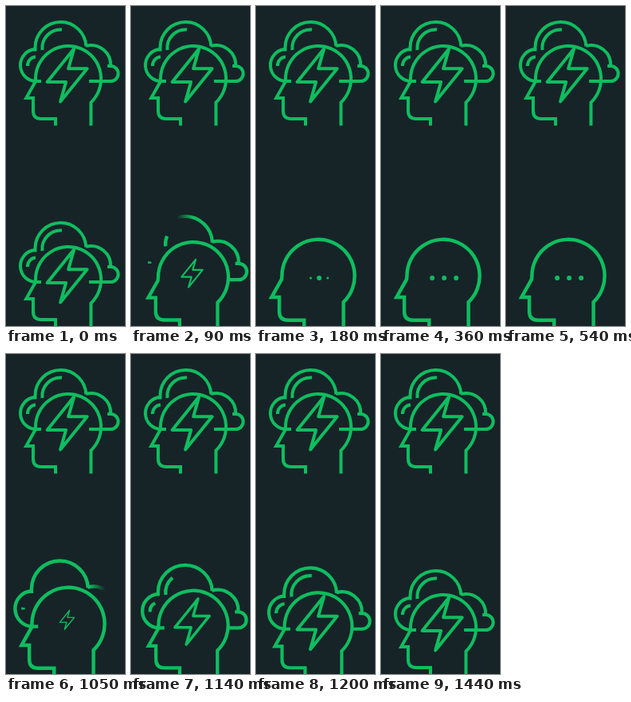
An HTML page with a canvas that plays this animation: 149 px wide and 400 px high, repeating every 1920 ms.

```html
<!DOCTYPE html>
<html lang="en">
<head>
<meta charset="utf-8">
<style>
  html, body { margin: 0; overflow: hidden; background: #162428; }
  canvas { display: block; }
</style>
</head>
<body>
<canvas id="stage" width="149" height="400"></canvas>
<script>
const ctx = document.getElementById('stage').getContext('2d');
const LOOP = 1920, GROWTH = 0.11;
const BG = '#162428', GREEN = '#0fbd5f', CLEAR = '#0fbd5f00';

const head = new Path2D('M62 149.5V141H44Q34 141 34 131V115H25.3L36.6 95L37 91A41 41 0 1 1 106.4 120.6V149.5');
const cloud = new Path2D('M44 94H38A20 20 0 0 1 36 54.1M36.5 56.5V52A32 32 0 0 1 68.4 20' +
  'A32 32 0 0 1 100.3 50.5M100 49.9A24.5 24.5 0 0 1 131 75M127 75H131A9.5 9.5 0 0 1 131 94H120');
const smallArc = new Path2D('M27 75A11 11 0 0 1 37 63.5');
const bigArc = new Path2D('M45.5 55A23 23 0 0 1 70 29.5');
const bolt = new Path2D('M8.5 -33L-25 8.3H-1.5L-8.5 33L25 -8.3H1.5Z');

const outQuad = p => 1 - (1 - p) ** 2;
const outCubic = p => 1 - (1 - p) ** 3;

function poseAt(t) {
  const ramp = (from, to) => Math.min(1, Math.max(0, (t - from) / (to - from)));
  const leaving = t < 700;
  return {
    zoom: 1 + GROWTH * outQuad(ramp(30, 180)) * (1 - outCubic(ramp(1080, 1440))),
    leaving,
    wipe: leaving ? 170 * ramp(30, 165) : 190 * ramp(900, 1140),
    small: leaving ? 1 - ramp(30, 100) : ramp(1030, 1180),
    big: leaving ? 1 - ramp(30, 120) : ramp(1055, 1200),
    bolt: leaving ? 1 - ramp(30, 150) : outQuad(ramp(1010, 1240)),
    tail: leaving ? 1 - ramp(30, 90) : outQuad(ramp(1230, 1440)),
    spread: outCubic(ramp(80, 380)),
    midDot: ramp(80, 175),
    sideDot: outQuad(ramp(90, 400)),
    slide: 46 * Math.max(0, (t - 720) / 150) ** 2
  };
}

function strokePart(path, length, shown) {
  if (shown <= 0) return;
  ctx.setLineDash(shown < 1 ? [length * shown, 999] : []);
  ctx.stroke(path);
  ctx.setLineDash([]);
}

function drawDots(pose) {
  if (pose.slide > 100) return;
  ctx.save();
  ctx.clip(head);
  ctx.fillStyle = GREEN;
  for (const i of [-1, 0, 1]) {
    const radius = 2.7 * (i ? pose.sideDot : pose.midDot);
    ctx.beginPath();
    ctx.arc(79 + (i * 15 * pose.spread - pose.slide) / (1 + GROWTH), 93.4, radius, 0, 7);
    ctx.fill();
  }
  ctx.restore();
}

function drawIcon(top, pose) {
  ctx.save();
  ctx.translate(78, top + 50 - 84 * (pose.zoom - 1));
  ctx.scale(pose.zoom, pose.zoom);
  ctx.translate(-78, -50);
  ctx.lineWidth = 4;

  const edge = ctx.createLinearGradient(pose.wipe - 18, 0, pose.wipe, 0);
  edge.addColorStop(0, pose.leaving ? CLEAR : GREEN);
  edge.addColorStop(1, pose.leaving ? GREEN : CLEAR);
  ctx.strokeStyle = edge;
  ctx.stroke(cloud);

  ctx.strokeStyle = GREEN;
  strokePart(smallArc, 17, pose.small);
  strokePart(bigArc, 38, pose.big);
  ctx.stroke(head);
  drawDots(pose);

  if (pose.tail > 0) {
    ctx.beginPath();
    ctx.moveTo(120.5, 94);
    ctx.lineTo(120 - 16 * pose.tail, 94);
    ctx.stroke();
  }
  if (pose.bolt > 0) {
    ctx.translate(76.6, 86.6);
    ctx.scale(pose.bolt, pose.bolt);
    ctx.lineJoin = 'round';
    ctx.stroke(bolt);
  }
  ctx.restore();
}

const rest = poseAt(0);

function frame(now) {
  ctx.fillStyle = BG;
  ctx.fillRect(0, 0, 149, 400);
  drawIcon(0, rest);
  drawIcon(251, poseAt(now % LOOP));
  requestAnimationFrame(frame);
}
requestAnimationFrame(frame);
</script>
</body>
</html>
```
